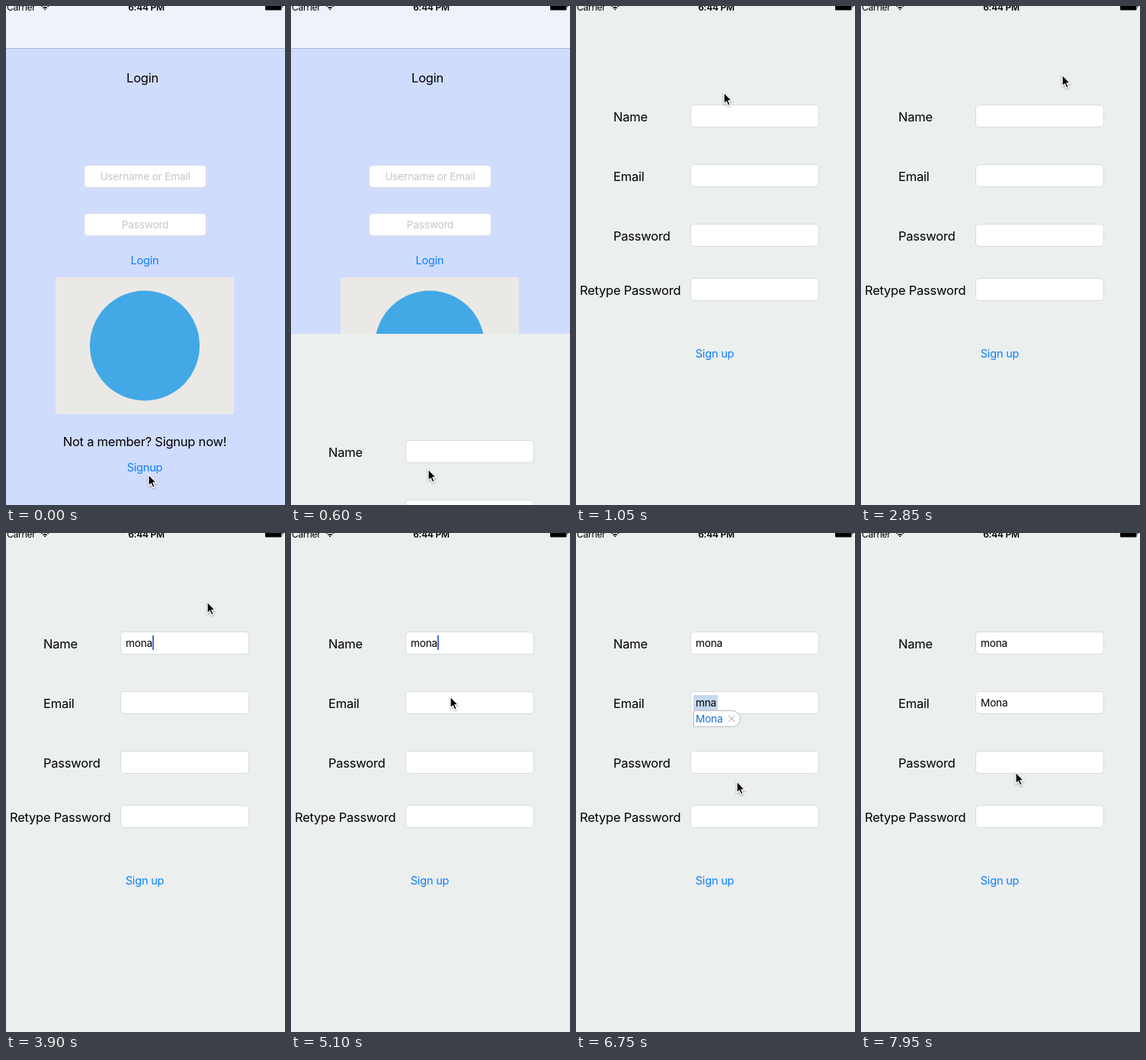
An HTML page that plays this animation: 366x653 px, repeating every 8 s.

```html
<!DOCTYPE html>
<html lang="en">
<head>
<meta charset="utf-8">
<title>Sign up flow</title>
<style>
  html, body { margin: 0; width: 100%; height: 100%; overflow: hidden; background: #ebefee; }
  svg { display: block; width: 366px; height: 653px; font: 16.5px Inter, sans-serif; letter-spacing: -.014em; }
  .mid { text-anchor: middle; }
  .link { font-size: 14.6px; fill: #0a7fff; }
  .small { font-size: 13.7px; }
  .hint { fill: #c7c7cb; }
  .box { fill: #fff; stroke: #d9dcdc; }
  .status { font-size: 12px; }
  #pointer { filter: drop-shadow(0 1px 1px #0005); }
</style>
</head>
<body>
<svg viewBox="0 0 366 653">
  <g id="login">
    <rect width="366" height="653" fill="#d0dcfd"/>
    <rect width="366" height="55" fill="#eef3fb"/>
    <rect y="55" width="366" height="1" fill="#a9b5d2"/>
    <text class="mid" x="179" y="99.5">Login</text>
    <rect class="box" x="102.5" y="208.5" width="160" height="29" rx="4.5"/>
    <text class="mid small hint" x="182.5" y="227.5">Username or Email</text>
    <rect class="box" x="102.5" y="271.5" width="160" height="29" rx="4.5"/>
    <text class="mid small hint" x="182.5" y="290.5">Password</text>
    <text class="mid link" x="182" y="337.5">Login</text>
    <rect x="65" y="355" width="234" height="179" fill="#ebe9e6"/>
    <circle cx="182" cy="444.5" r="72" fill="#42a9e6"/>
    <text class="mid" x="182" y="575.5">Not a member? Signup now!</text>
    <text class="mid link" x="182" y="608.5">Signup</text>
  </g>

  <g id="sheet">
    <rect y="-10" width="366" height="680" fill="#ebefee"/>
    <text x="49" y="150.5">Name</text>
    <text x="49" y="228.5">Email</text>
    <text x="49" y="306.5">Password</text>
    <text x="5" y="377.5">Retype Password</text>
    <rect class="box" x="150.5" y="129.5" width="168" height="29" rx="4.5"/>
    <rect class="box" x="150.5" y="207.5" width="168" height="29" rx="4.5"/>
    <rect class="box" x="150.5" y="285.5" width="168" height="29" rx="4.5"/>
    <rect class="box" x="150.5" y="356.5" width="168" height="29" rx="4.5"/>
    <text class="mid link" x="182" y="459.5">Sign up</text>
    <rect id="mark" x="154" y="212" width="32" height="20" fill="#c6d8ef"/>
    <text class="small value" x="157" y="149"></text>
    <text class="small value" x="157" y="227"></text>
    <text class="small value" x="157" y="305"></text>
    <rect id="caret" width="2" height="19" fill="#4a6be0"/>
    <g id="bubble">
      <path d="M154.5 232.5H205a10.5 10.5 0 0 1 0 21H154.5Z" fill="#fff" stroke="#b9bbbb"/>
      <text class="small" x="157" y="248" fill="#1a6fd6">Mona</text>
      <path d="M200 239l8 8m0-8l-8 8" stroke="#a5a7a7"/>
    </g>
  </g>

  <g id="statusbar">
    <text class="status" x="1" y="6">Carrier</text>
    <text class="status mid" x="184" y="6" font-weight="600">6:44 PM</text>
    <path d="M46.5 .8Q51.2 -3.4 55.9 .8M48.5 2.8Q51.2 .6 53.9 2.8" fill="none" stroke="#000" stroke-width="1.4"/>
    <path d="M49.7 4L51.2 5.5L52.7 4Q51.2 2.9 49.7 4Z"/>
    <path d="M340 -4H361.5V4.5Q361.5 5.5 360.5 5.5H341Q340 5.5 340 4.5ZM362.5 -1.5Q364.5 0 362.5 2.5Z"/>
  </g>

  <path id="pointer" d="M0 0V15L3.3 12L5.7 17.3L8.3 16.2L6 11H10.6Z" stroke="#fff" stroke-width="1.3"/>
</svg>
<script>
const LOOP = 8000, STEP = 150;
const $ = id => document.getElementById(id);
const values = document.querySelectorAll('.value');
const show = (el, on) => el.setAttribute('visibility', on ? 'visible' : 'hidden');
const clamp = v => Math.min(1, Math.max(0, v));

// Pointer path: time, x, y
const path = [
  [0, 187, 613], [300, 180, 606], [600, 180, 606], [1050, 194, 113],
  [1200, 194, 113], [1500, 192, 143], [1950, 192, 143], [2100, 197, 152],
  [2400, 264, 90], [4500, 264, 90], [5100, 209, 214], [5250, 209, 217],
  [6450, 209, 217], [6750, 211, 325], [6900, 211, 325], [7200, 202, 311],
  [7650, 202, 311], [7950, 203, 313], [LOOP, 203, 313]
];

// Keyboard input: time, focused field, its text
const input = [
  [2100, 0, ''], [3600, 0, 'm'], [3750, 0, 'mo'], [3900, 0, 'mona'],
  [5250, 1, ''], [5850, 1, 'mn'], [6000, 1, 'mna'], [7200, 1, 'Mona'], [7200, 2, '']
];

function pointerAt(t) {
  const i = path.findIndex(p => p[0] > t);
  const [t0, x0, y0] = path[i - 1], [t1, x1, y1] = path[i];
  const k = (t - t0) / (t1 - t0);
  return [x0 + (x1 - x0) * k, y0 + (y1 - y0) * k].map(Math.round);
}

// Critically damped spring that brings the sheet up
function sheetOffset(t) {
  const w = Math.max(0, t - 538) * .0188;
  return w ? 651 * (1 + w) * Math.exp(-w) : 663;
}

function draw(t) {
  $('sheet').setAttribute('transform', `translate(0 ${Math.round(sheetOffset(t))})`);
  $('pointer').setAttribute('transform', `translate(${pointerAt(t)})`);

  const texts = ['', '', ''];
  let focus = null;
  for (const event of input) {
    if (event[0] > t) break;
    texts[event[1]] = event[2];
    focus = event;
  }
  values.forEach((el, i) => el.textContent = texts[i]);

  const suggesting = t >= 6300 && t < 7200;
  for (const id of ['mark', 'bubble']) show($(id), suggesting);
  show($('caret'), focus && !suggesting);
  if (focus) {
    const [since, field, text] = focus;
    const width = text ? values[field].getComputedTextLength() : 0;
    $('caret').setAttribute('x', 157 + Math.round(width));
    $('caret').setAttribute('y', 134 + 78 * field);
    $('caret').setAttribute('opacity', clamp((Math.abs(t - since - 825) - 75) / 300));
  }
}

const start = performance.now();
function tick() {
  const t = (performance.now() - start) % LOOP;
  draw(Math.floor(t / STEP) * STEP);
  requestAnimationFrame(tick);
}
tick();
</script>
</body>
</html>
```
